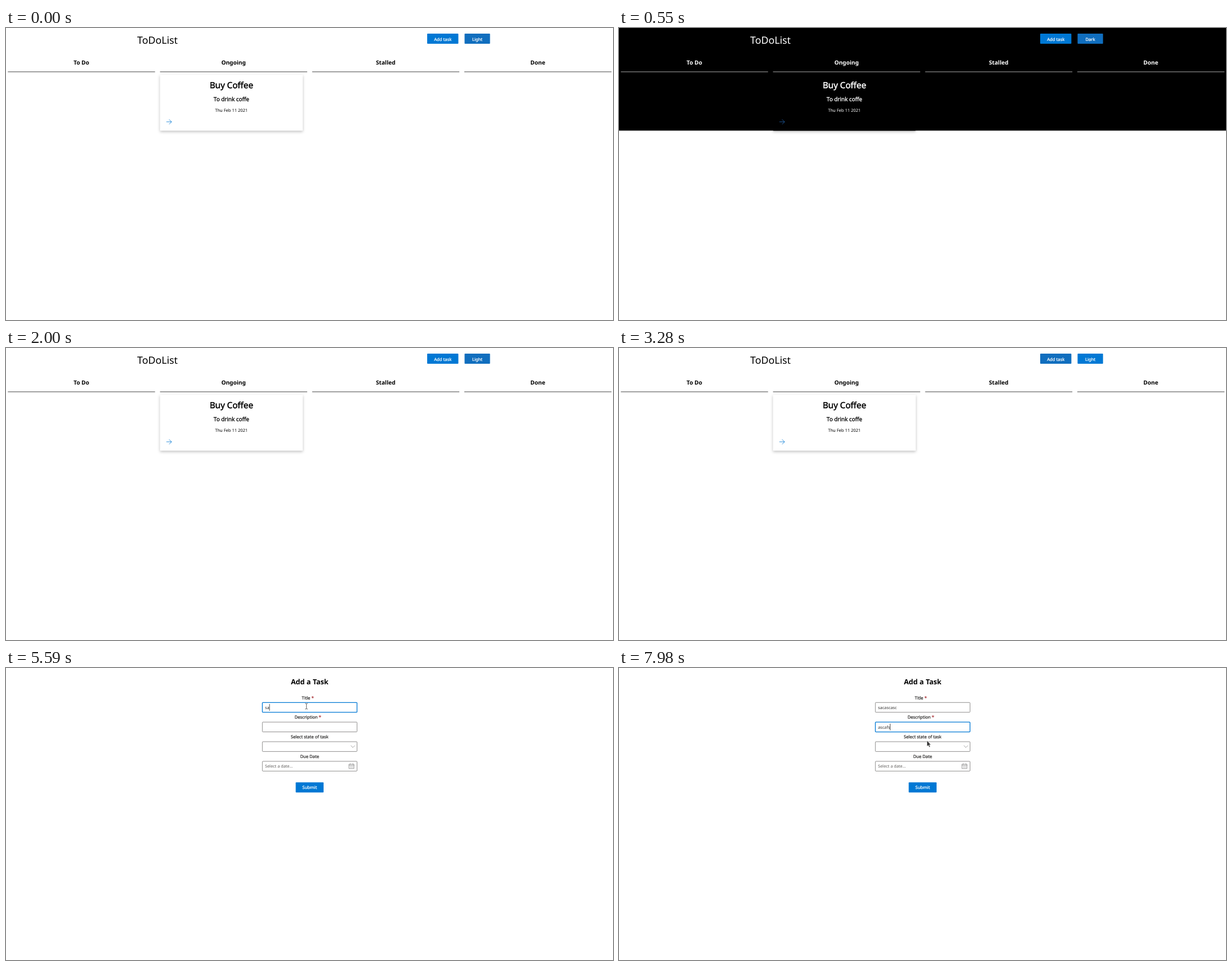
Animation of 1078x519 px, one loop 8000 ms. Source, as an HTML page:

```html
<!DOCTYPE html>
<html lang="en">
<head>
<meta charset="utf-8">
<title>To-do board</title>
<style>
  html, body { margin: 0; width: 100%; height: 100%; overflow: hidden; background: #fff; }
  svg { display: block; width: 1078px; height: 519px; }
  text { font: 7.4px "Noto Sans", "Open Sans", sans-serif; text-rendering: geometricPrecision; fill: currentColor; text-anchor: middle; }
  /* Regular weight with a hairline outline gives a semibold look */
  .semi { font-size: 7.65px; stroke: currentColor; stroke-width: .032em; }
  .bold { font-weight: 700; }
  .left { text-anchor: start; font-size: 7.3px; }
  .line { fill: none; stroke-linecap: round; stroke-linejoin: round; }
  .button { fill: #0078d4; }
  .button.hover { fill: #106ebe; }
  .button.pressed { fill: #1d5091; }
  .button + text { color: #fff; }
  #board { color: #000; --page: #fff; --rule: #444; --arrow: #0078d4; }
  #board.dark { color: #fff; --page: #000; --rule: #aaa; --arrow: #2566b0; }
  #panel, #card { fill: var(--page); }
  #card { filter: drop-shadow(0 2.2px 2.4px rgba(0, 0, 0, .25)); }
  #form { color: #323130; }
  .field { fill: #fff; stroke: #605e5c; stroke-width: .7; }
  .field.hover { stroke: #201f1e; }
  .field.focus { stroke: #0078d4; stroke-width: 1.3; }
  .star { fill: #a4262c; stroke: #a4262c; }
  .hint { fill: #605e5c; }
</style>
</head>
<body>
<svg viewBox="0 0 1078 519">
  <g id="board">
    <rect id="panel" width="1078" height="182.4"/>
    <text x="269" y="28.2" style="font-size:17.8px">ToDoList</text>
    <rect id="add" class="button" x="748" y="10" width="55.4" height="18" rx="1"/>
    <text class="semi" x="775.7" y="22.5">Add task</text>
    <rect id="theme" class="button" x="814.4" y="10" width="45.2" height="18" rx="1"/>
    <text id="themeName" class="semi" x="837" y="22.5">Light</text>
    <g id="columns"></g>
    <rect id="card" x="273.5" y="83" width="253.5" height="99.4" rx="1"/>
    <text class="semi" x="400.3" y="107.4" style="font-size:15.2px">Buy Coffee</text>
    <text class="semi" x="400.3" y="130" style="font-size:9.85px">To drink coffe</text>
    <text x="400.2" y="148.7" style="font-size:7.5px">Thu Feb 11 2021</text>
    <path class="line" d="M285.2 166.8H294M290 162.8l4 4-4 4" stroke="var(--arrow)" stroke-width=".8"/>
    <rect id="status" y="518" width="71" height="1" fill="#ccc"/>
  </g>

  <g id="form">
    <text class="bold" x="539.3" y="29" style="font-size:12.6px;color:#000">Add a Task</text>
    <text class="semi" x="535.9" y="55.5">Title <tspan class="star">*</tspan></text>
    <text class="semi" x="536.1" y="90.4">Description <tspan class="star">*</tspan></text>
    <text class="semi" x="539.2" y="125.3">Select state of task</text>
    <text class="semi" x="539.2" y="160.2">Due Date</text>
    <g id="fields"></g>
    <text id="title" class="left" x="460" y="72.8"></text>
    <text id="description" class="left" x="460" y="107.6"></text>
    <text class="left hint" x="460" y="177.3">Select a date…</text>
    <path class="line" d="M612.6 138l3.4 3.4 3.4-3.4" stroke="#777" stroke-width=".7"/>
    <path class="line" d="M609.4 171h8.6v7.8h-8.6zM609.4 173h8.6M611.4 170v1M616 170v1" stroke="#777" stroke-width=".7"/>
    <path class="line" d="M611.2 174.9h5.2M611.2 176.9h5.2" stroke="#777" stroke-width=".7" stroke-dasharray=".2 1.5"/>
    <rect class="button" x="514.5" y="203.2" width="49.5" height="18" rx="1"/>
    <text class="semi" x="539.2" y="215.3" style="font-size:7.8px">Submit</text>
    <rect id="caret" width=".8" height="12" fill="#222"/>
    <g id="cursor">
      <path id="beam" class="line" d="M-2-5q2 0 2 1q0-1 2-1M0-4V4M-2 5q2 0 2-1q0 1 2 1" stroke="#444" stroke-width=".8"/>
      <path id="pointer" d="M0 0V10l2.3-2 1.7 3.5 1.6-.8-1.7-3.3h3z" fill="#333" stroke="#fff" stroke-width=".4"/>
    </g>
  </g>
</svg>
<script>
const LOOP = 8000;
const $ = id => document.getElementById(id);
const show = (id, on) => $(id).style.display = on ? '' : 'none';
const within = (t, from, to) => t >= from && t < to;
const buttonClass = (hover, pressed) => 'button' + (pressed ? ' pressed' : hover ? ' hover' : '');

$('columns').innerHTML = ['To Do', 'Ongoing', 'Stalled', 'Done'].map((name, i) => {
  const x = 3.3 + i * 270.2;
  return `<rect x="${x}" y="77.4" width="261.4" height="1" fill="var(--rule)"/>
    <text class="bold" x="${x + 130.6}" y="64.7" style="font-size:10.1px">${name}</text>`;
}).join('');

const fieldTops = [0, 1, 2, 3].map(i => 61 + i * 34.85);
$('fields').innerHTML = fieldTops.map(y =>
  `<rect class="field" x="455.3" y="${y + .3}" width="168.1" height="17.4" rx="1"/>`).join('');
const fields = [...document.querySelectorAll('.field')];

// Keystroke times for each input
const inputs = [
  { id: 'title', text: 'sacascasc', keys: [5470, 5590, 5910, 6230, 6285, 6340, 6395, 6450, 6505] },
  { id: 'description', text: 'ascafs', keys: [7190, 7270, 7350, 7430, 7510, 7780] }
];

// Pointer stops: time, x, y
const path = [
  [3780, 556, 165], [4010, 533.5, 68], [6550, 533.5, 68],
  [6620, 536, 103], [7800, 536, 103], [7980, 547, 129.2], [LOOP, 547, 129.2]
];

function cursorAt(t) {
  const i = Math.max(1, path.findIndex(p => p[0] > t));
  const [t0, x0, y0] = path[i - 1], [t1, x1, y1] = path[i];
  const k = (t - t0) / (t1 - t0);
  return [x0 + (x1 - x0) * k, y0 + (y1 - y0) * k];
}

function drawBoard(t) {
  const dark = within(t, 550, 2000);
  $('board').classList.toggle('dark', dark);
  $('themeName').textContent = dark ? 'Dark' : 'Light';
  $('theme').setAttribute('class',
    buttonClass(t < 2300, within(t, 420, 550) || within(t, 1760, 2000)));
  $('add').setAttribute('class', buttonClass(t >= 2300, t >= 3460));
  show('status', within(t, 2720, 3280));
}

function drawForm(t) {
  const focus = t < 5370 ? -1 : t < 6790 ? 0 : 1;
  const visible = t >= 3780;
  const [x, y] = cursorAt(t);
  const hover = visible ? fieldTops.findIndex(top => within(y, top, top + 18)) : -1;

  fields.forEach((field, i) => field.setAttribute('class',
    'field' + (i === focus ? ' focus' : i === hover ? ' hover' : '')));
  for (const { id, text, keys } of inputs)
    $(id).textContent = text.slice(0, keys.filter(k => k <= t).length);

  show('caret', focus >= 0);
  if (focus >= 0) {
    const end = 460 + $(inputs[focus].id).getComputedTextLength();
    $('caret').setAttribute('x', end);
    $('caret').setAttribute('y', fieldTops[focus] + 3);
  }

  const typing = hover === 0 || hover === 1;
  show('cursor', visible);
  show('beam', typing);
  show('pointer', !typing);
  $('cursor').setAttribute('transform', `translate(${x} ${y})`);
}

function frame() {
  const t = performance.now() % LOOP;
  const onForm = t >= 3550;
  show('board', !onForm);
  show('form', onForm);
  (onForm ? drawForm : drawBoard)(t);
  requestAnimationFrame(frame);
}
frame();
</script>
</body>
</html>
```
